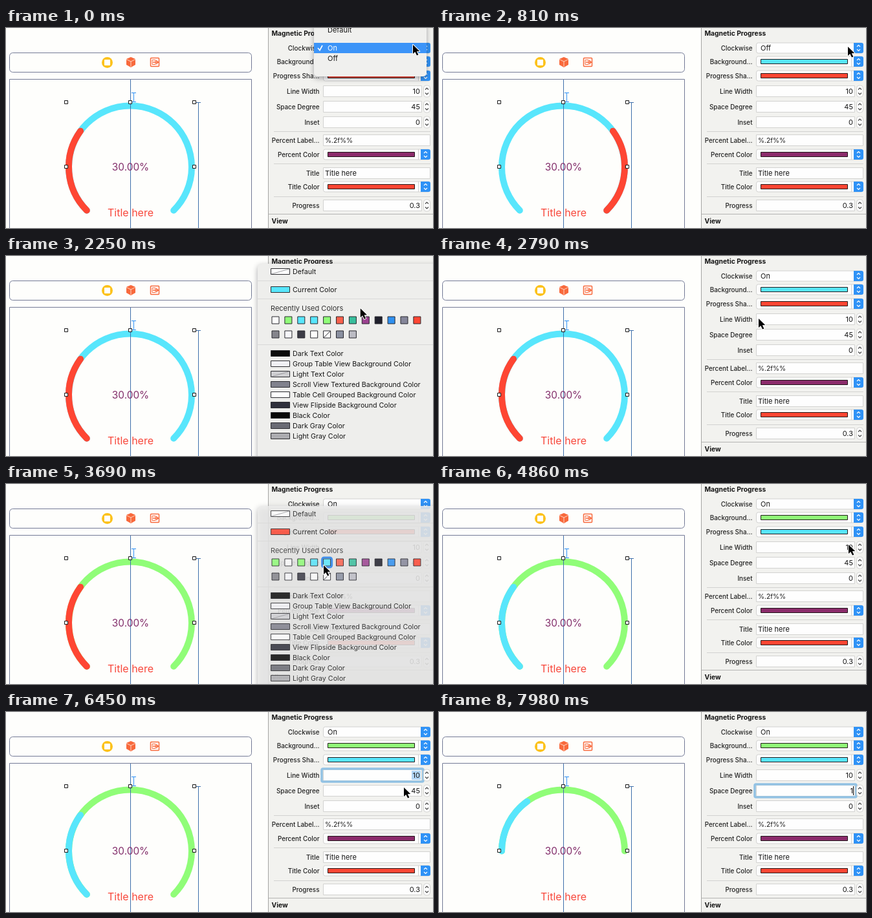
Animation, 660 px wide and 310 px high, one loop 8 s. Source, as an HTML page with a canvas:

```html
<!DOCTYPE html>
<html lang="en">
<head>
<meta charset="utf-8">
<title>Progress inspector</title>
<style>
  html, body { margin: 0; width: 100%; height: 100%; overflow: hidden; background: #fefefc; }
  canvas { display: block; }
</style>
</head>
<body>
<canvas id="stage" width="660" height="310"></canvas>
<script>
const ctx = document.getElementById('stage').getContext('2d');
const LOOP = 8000;
const CYAN = '#58e6fc', GREEN = '#90fd78', RED = '#ff4633', PURPLE = '#8c2c6c';
const PAPER = '#fefefc', PANEL = '#f2f2ef', MENU = '#f0f0ee', POPUP = '#eeeeec', FIELD = '#fefefe';
const FRAME = '#737a96', GUIDE = '#3f70ab', EDGE = '#d2d2d0', INK = '#161616', BLUE = '#2f92f6';

// time, x, y of the pointer tip
const POINTER = [
  [0, 629, 26], [100, 629, 26], [280, 627, 45], [480, 627, 45], [720, 632, 29], [960, 632, 29],
  [1150, 628, 14], [1320, 628, 14], [1650, 621, 59], [1850, 648, 52], [1950, 648, 52],
  [2450, 494, 97], [2800, 494, 97], [3080, 648, 74], [3180, 648, 74], [3560, 491, 126],
  [3800, 491, 126], [4500, 633, 94], [6200, 633, 94], [6450, 615, 117], [6650, 624, 121], [8000, 624, 121]
];

const clamp = v => Math.max(0, Math.min(1, v));
const ease = v => v * v * (3 - 2 * v);
const between = (t, a, b) => t >= a && t < b;

function pointerAt(t) {
  const i = POINTER.findIndex(k => k[0] > t);
  const [t0, x0, y0] = POINTER[i - 1], [t1, x1, y1] = POINTER[i];
  const p = ease((t - t0) / (t1 - t0));
  return [x0 + (x1 - x0) * p, y0 + (y1 - y0) * p];
}

function line(color, width, ...points) {
  ctx.beginPath();
  for (let i = 0; i < points.length; i += 2) ctx.lineTo(points[i], points[i + 1]);
  ctx.strokeStyle = color;
  ctx.lineWidth = width;
  ctx.stroke();
}

function box(x, y, w, h, fill, stroke, radius = 0, width = 1) {
  ctx.beginPath();
  ctx.roundRect(x, y, w, h, radius);
  if (fill) { ctx.fillStyle = fill; ctx.fill(); }
  if (stroke) { ctx.strokeStyle = stroke; ctx.lineWidth = width; ctx.stroke(); }
}

function shadowBox(x, y, w, h, fill, radius) {
  ctx.save();
  ctx.shadowColor = 'rgba(40,40,50,.4)';
  ctx.shadowBlur = 9;
  ctx.shadowOffsetY = 3;
  box(x, y, w, h, fill, null, radius);
  ctx.restore();
}

function text(str, x, y, size = 11, color = INK, align = 'left', weight = 400) {
  ctx.font = `${weight} ${size}px Inter, Roboto, sans-serif`;
  ctx.textAlign = align;
  ctx.fillStyle = color;
  ctx.fillText(str, x, y + size * 0.36);
}

function arc(from, to, color, width, reverse = false) {
  const rad = Math.PI / 180;
  ctx.beginPath();
  ctx.arc(192, 215.5, 100 - width / 2, from * rad, to * rad, reverse);
  ctx.strokeStyle = color;
  ctx.lineWidth = width;
  ctx.lineCap = 'round';
  ctx.stroke();
  ctx.lineCap = 'butt';
}

function drawToolbar() {
  box(5.5, 38.5, 374, 30, null, FRAME, 5);
  box(148, 45, 17, 17, '#fcc21c', null, 9);
  box(152, 49, 9, 9, '#fff', null, 1);
  ctx.beginPath();
  [[193, 45], [200, 48], [200, 57], [193, 61], [186, 57], [186, 48]].forEach(p => ctx.lineTo(...p));
  ctx.fillStyle = '#f8693c';
  ctx.fill();
  line('#ffd8c4', 1, 186, 48.5, 193, 52, 200, 48.5);
  line('#ffd8c4', 1, 193, 52, 193, 60);
  box(223.5, 46.5, 13, 13, '#fff', '#f8693c', 1, 1.5);
  line('#f8693c', 1.5, 227, 53, 236, 53);
  line('#f8693c', 1.5, 232, 50, 235, 53, 232, 56);
  box(226, 49.5, 5, 7, null, '#f8693c');
}

function drawCanvas(s) {
  const start = 90 + s.space, end = 450 - s.space, sweep = 0.3 * (end - start);
  drawToolbar();
  box(5.5, 79.5, 374, 240, null, FRAME);
  arc(start, end, s.track, s.width);
  if (s.clockwise) arc(start, start + sweep, s.bar, s.width);
  else arc(end, end - sweep, s.bar, s.width, true);
  line(GUIDE, 1, 192.5, 80, 192.5, 310);
  line(GUIDE, 1, 297.5, 115, 297.5, 310);
  line(GUIDE, 1, 293, 115.5, 301, 115.5);
  line(BLUE, 1, 197.5, 100, 197.5, 114);
  line(BLUE, 1, 194, 100.5, 201, 100.5);
  line(BLUE, 1, 194, 114.5, 201, 114.5);
  [[93, 115], [192, 115], [291, 115], [93, 215], [291, 215]].forEach(([x, y]) =>
    box(x - 2.5, y - 2.5, 5, 5, '#fff', '#181818'));
  text('30.00%', 192.5, 215.5, 15.4, '#84306c', 'center');
  text('Title here', 192.5, 286, 16, '#f8483c', 'center');
}

function chevrons(x, y, color, gap) {
  line(color, 1.2, x - 2.5, y - gap, x, y - gap - 2.5, x + 2.5, y - gap);
  line(color, 1.2, x - 2.5, y + gap, x, y + gap + 2.5, x + 2.5, y + gap);
}

const label = (str, y) => text(str, 484.5, y, 9.9, '#222', 'right', 500);

function popupButton(y) {
  box(490.5, y - 8, 165, 16, FIELD, EDGE, 3);
  box(641, y - 8, 15, 16, BLUE, null, [0, 3, 3, 0]);
  chevrons(648.5, y, '#fff', 2);
}

function colorRow(name, y, color) {
  label(name, y);
  popupButton(y);
  line(EDGE, 1, 637.5, y - 8, 637.5, y + 8);
  box(497.5, y - 3.5, 134, 7, color, '#201818');
}

function numberRow(name, y, value, mode) {
  label(name, y);
  box(490.5, y - 8.5, 152, 17, FIELD, EDGE);
  if (mode) box(488, y - 10, 157, 20, null, '#92c2e4', 2, 3.5);
  if (mode === 'selected') box(627, y - 7, 14, 14, '#b3d6f6');
  text(value, 640, y, 11, INK, 'right');
  if (mode === 'typing') line('#000', 1, 640.5, y - 7, 640.5, y + 7);
  box(645.5, y - 9, 10, 18, FIELD, EDGE, 4);
  chevrons(650.5, y, '#444', 2.5);
}

function textRow(name, y, value, size) {
  label(name, y);
  box(490.5, y - 8.5, 165, 17, FIELD, EDGE);
  text(value, 493, y, size);
}

function drawInspector(s) {
  ctx.fillStyle = PANEL;
  ctx.fillRect(405, 0, 255, 310);
  line('#a6a6a4', 1, 405.5, 0, 405.5, 310);
  text('Magnetic Progress', 410.5, 8, 10.3, INK, 'left', 700);
  label('Clockwise', 31);
  popupButton(31);
  text(s.clockwise ? 'On' : 'Off', 497, 31);
  colorRow('Background...', 52, s.track);
  colorRow('Progress Sha...', 74, s.bar);
  numberRow('Line Width', 98, s.widthText, s.widthMode);
  numberRow('Space Degree', 122, s.spaceText, s.spaceMode);
  numberRow('Inset', 146, '0');
  textRow('Percent Label...', 174, '%.2f%%', 10.2);
  colorRow('Percent Color', 196, PURPLE);
  textRow('Title', 225, 'Title here');
  colorRow('Title Color', 246, RED);
  numberRow('Progress', 275, '0.3');
  [160.5, 210.5, 261.5].forEach(y => line(EDGE, 1, 414, y, 656, y));
  line('#b4b4b2', 1, 406, 288.5, 660, 288.5);
  text('View', 410.5, 299, 10.3, INK, 'left', 700);
}

// The menu opens with its checked item over the button.
function drawMenu(checked, pointerY) {
  const top = 31 - checked * 16;
  const hovered = Math.round((pointerY + 3 - top) / 16);
  shadowBox(476, top - 40, 174, 84, MENU, 5);
  box(476, top + hovered * 16 - 8, 174, 16, '#3c94f8');
  line(hovered === checked ? '#fff' : INK, 1.6, 482, 31, 485, 34.5, 489, 27);
  text('Default', 497, top - 28);
  ['On', 'Off'].forEach((name, i) =>
    text(name, 497, top + i * 16, 11, i === hovered ? '#fff' : INK));
}

function swatch(x, y, w, color, slash) {
  box(x + 0.5, y - 4.5, w, 9, color, '#2c2c30');
  if (slash) line('#9c9ca0', 1, x + 1, y + 4, x + w, y - 4);
}

const NAMED = [
  ['Dark Text', '#0c0c0c'], ['Group Table View Background', '#f0f0f4'], ['Light Text', '#cfcfd2', true],
  ['Scroll View Textured Background', '#80818c'], ['Table Cell Grouped Background', '#fefefe'],
  ['View Flipside Background', '#30313c'], ['Black', '#080808'], ['Dark Gray', '#6a6b74'], ['Light Gray', '#acacb0']
];
const RECENT_REST = ['#f8604c', '#38be9c', '#9c4290', '#20202c', '#2f90f0', '#85869a', RED,
  '#85858c', '#f6f6fa', '#3c3c46', '#fcfcfc', '#fcfcfc', '#8a90a0', '#bcbcc4'];

function drawColorPopup(current, recent, y0, hover) {
  shadowBox(389, y0 - 40, 290, 330, POPUP, 6);
  swatch(409, y0 - 28, 29, '#fefefe', true);
  text('Default', 443, y0 - 28, 10.7);
  swatch(409, y0, 29, current);
  text('Current Color', 443, y0, 10.7);
  text('Recently Used Colors', 409, y0 + 29, 11, '#333');
  [...recent, ...RECENT_REST].forEach((color, i) => {
    const x = 416 + (i % 12) * 19.9, y = y0 + (i < 12 ? 47 : 69);
    box(x - 5, y - 5, 11, 11, color, '#26262c');
    if (i === 4 && hover) box(x - 7, y - 7, 15, 15, null, '#2480ec', 3, 3);
    if (i === 16) line('#26262c', 1, x - 5, y + 6, x + 6, y - 5);
  });
  [-13.5, 14.5, 85.5].forEach(dy => line('#d9d9d8', 1, 389, y0 + dy, 660, y0 + dy));
  NAMED.forEach(([name, color, slash], i) => {
    const y = y0 + 99 + i * 16;
    swatch(409, y, 29, color, slash);
    text(name + ' Color', 443, y, 10.7);
  });
}

function drawPointer(x, y) {
  ctx.beginPath();
  [[0, 0], [0, 14], [3.3, 11], [6, 16.5], [8.4, 15.4], [5.8, 10.3], [10.2, 10]]
    .forEach(([dx, dy]) => ctx.lineTo(x + dx, y + dy));
  ctx.closePath();
  ctx.lineJoin = 'round';
  ctx.strokeStyle = '#fff';
  ctx.lineWidth = 2;
  ctx.stroke();
  ctx.lineJoin = 'miter';
  ctx.fillStyle = '#000';
  ctx.fill();
}

// Opens at once, then fades out over 200 ms.
function overlay(t, open, close, draw) {
  if (!between(t, open, close + 200)) return;
  ctx.globalAlpha = 1 - clamp((t - close) / 200);
  draw();
  ctx.globalAlpha = 1;
}

// Steps are [time, text, mode]; the latest one reached applies.
const fieldAt = (t, steps) => steps.findLast(step => t >= step[0]);
const WIDTH_STEPS = [
  [0, '10', ''], [4950, '10', 'selected'], [5200, '2', 'typing'], [5320, '20', 'typing'], [5520, '20', 'selected'],
  [5850, '1', 'typing'], [5970, '10', 'typing'], [6150, '10', 'selected'], [6700, '10', '']
];
const SPACE_STEPS = [
  [0, '45', ''], [6700, '45', 'selected'], [7000, '9', 'typing'], [7130, '90', 'typing'],
  [7350, '90', 'selected'], [7900, '1', 'typing']
];

function stateAt(t) {
  const [, widthText, widthMode] = fieldAt(t, WIDTH_STEPS);
  const [, spaceText, spaceMode] = fieldAt(t, SPACE_STEPS);
  return {
    clockwise: !between(t, 560, 1420),
    track: t < 2850 ? CYAN : GREEN,
    bar: t < 3900 ? RED : CYAN,
    width: between(t, 5520, 6150) ? 20 : 10,
    space: t < 7350 ? 45 : 90,
    widthText, widthMode, spaceText, spaceMode
  };
}

function render(t) {
  const s = stateAt(t);
  const [x, y] = pointerAt(t);
  ctx.fillStyle = PAPER;
  ctx.fillRect(0, 0, 660, 310);
  drawCanvas(s);
  drawInspector(s);
  overlay(t, 0, 360, () => drawMenu(0, y));
  overlay(t, 860, 1220, () => drawMenu(1, y));
  overlay(t, 1930, 2580, () =>
    drawColorPopup(CYAN, ['#fcfcfc', GREEN, CYAN, CYAN, GREEN], 52, t > 2400));
  overlay(t, 3160, 3660, () =>
    drawColorPopup(RED, [GREEN, '#fcfcfc', GREEN, CYAN, CYAN], 74, t > 3500));
  if (!between(t, 5200, 6200) && t < 7000) drawPointer(x, y);
}

function tick() {
  render(performance.now() % LOOP);
  requestAnimationFrame(tick);
}
tick();
</script>
</body>
</html>
```
